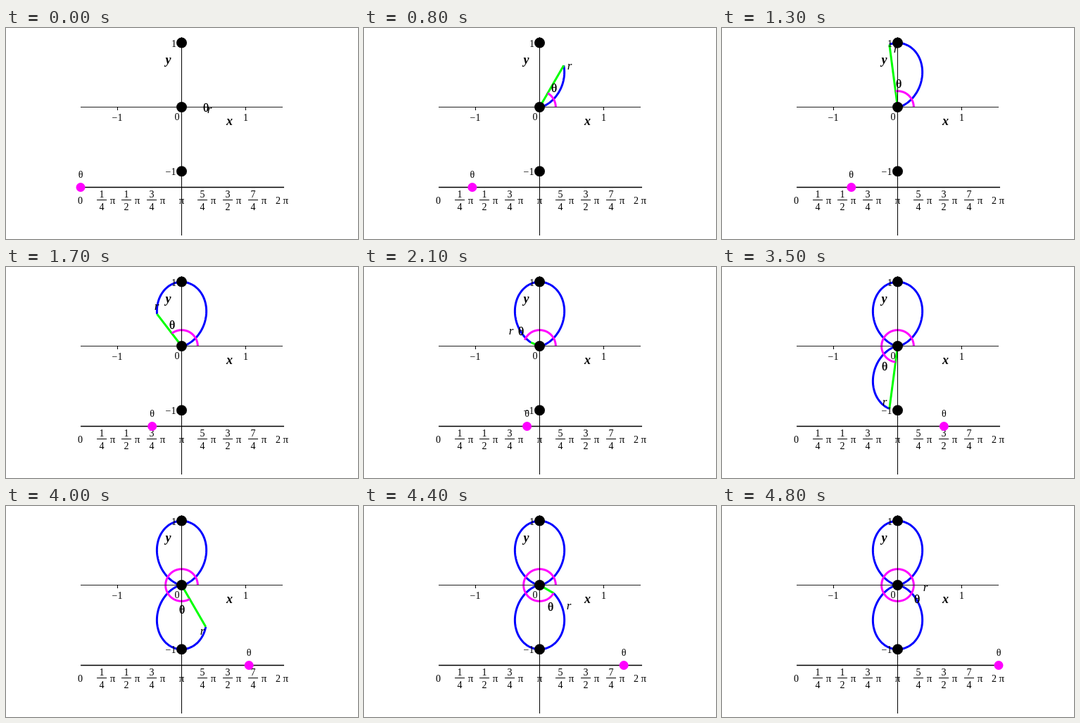
These frames come from a looping animation (500 by 300 pixels, 4900 ms). An HTML page:

```html
<!DOCTYPE html>
<html lang="en">
<head>
<meta charset="utf-8">
<title>Polar curve</title>
<style>
  html, body { margin: 0; width: 100%; height: 100%; overflow: hidden; background: #fff; }
  svg { display: block; width: 500px; height: 300px; }
  text { font: 14px "Liberation Serif", "Times New Roman", serif; text-anchor: middle; }
  .axis { font-weight: bold; font-style: italic; font-size: 18px; }
  .pi { font-size: 15px; }
  #rLabel { font-style: italic; font-size: 17px; }
  #arcLabel { font-size: 17px; stroke: #000; stroke-width: 0.4; }
  #knobLabel { font-size: 14px; }
  polyline, #radius { fill: none; stroke-width: 3; }
</style>
</head>
<body>
<svg viewBox="0 0 500 300">
  <polyline id="curve" stroke="#00f"/>
  <line id="radius" stroke="#0f0"/>
  <polyline id="arc" stroke="#f0f"/>
  <g shape-rendering="crispEdges">
    <rect x="106" y="112" width="287" height="1" fill="#222"/>
    <rect x="249" y="13" width="1" height="282"/>
    <rect x="158" y="112" width="1" height="5"/>
    <rect x="340" y="112" width="1" height="5"/>
  </g>
  <rect x="106" y="225.75" width="289" height="1.5"/>
  <g id="ticks">
    <text x="158" y="132">−1</text>
    <text x="340.5" y="132">1</text>
    <text x="243" y="131">0</text>
    <text x="238.5" y="27">1</text>
    <text x="234" y="209">−1</text>
    <text class="axis" x="317.5" y="138">x</text>
    <text class="axis" x="230.5" y="51">y</text>
    <text x="105.5" y="250">0</text>
    <text class="pi" x="249.5" y="250">π</text>
    <text x="392" y="250">2 <tspan class="pi">π</tspan></text>
  </g>
  <circle cx="249.5" cy="21" r="7.5"/>
  <circle cx="249.5" cy="112.5" r="7.5"/>
  <circle cx="249.5" cy="203.7" r="7.5"/>
  <text id="rLabel">r</text>
  <text id="arcLabel">θ</text>
  <circle id="knob" cy="226.5" r="6.5" fill="#f0f"/>
  <text id="knobLabel" y="213">θ</text>
</svg>
<script>
  const STEPS = 48, STEP_MS = 100, UNIT = 91.3, CX = 249.5, CY = 112.5;
  const $ = id => document.getElementById(id);
  const set = (id, attrs) => {
    for (const k in attrs) $(id).setAttribute(k, attrs[k]);
  };
  const polar = (r, a) => [CX + r * Math.cos(a), CY - r * Math.sin(a)];
  const radiusAt = a => UNIT * Math.sin(a) ** 2;

  // Fraction labels below the slider
  const fractions = [[1, 4], [1, 2], [3, 4], [5, 4], [3, 2], [7, 4]];
  $('ticks').innerHTML += fractions.map(([n, d]) => {
    const x = Math.round(99.7 + 143.5 * n / d);
    return `<text x="${x}" y="241">${n}</text><text x="${x}" y="259">${d}</text>
      <rect x="${x - 7}" y="244" width="14" height="1"/>
      <text class="pi" x="${x + 15.5}" y="250">π</text>`;
  }).join('');

  function trace(step, radius) {
    const points = [];
    for (let i = 0; i <= step * 5; i++) {
      const a = i / 5 / STEPS * 2 * Math.PI;
      points.push(polar(radius(a), a).map(v => v.toFixed(2)).join());
    }
    return points.join(' ');
  }

  function placeLabel(id, [x, y], dx, dy) {
    set(id, { x: Math.round(x + dx), y: Math.round(y + dy) });
  }

  function draw(step) {
    const a = step / STEPS * 2 * Math.PI, r = radiusAt(a);
    const [x2, y2] = polar(r, a);
    const knobX = 106 + 287 * step / STEPS;
    set('curve', { points: trace(step, radiusAt) });
    set('arc', { points: trace(step, () => UNIT / 4) });
    set('radius', { x1: CX, y1: CY, x2, y2 });
    placeLabel('rLabel', polar(40 + 0.47 * r, a - 0.1), 0, 5);
    placeLabel('arcLabel', polar(34, a * 0.9), 0.3, 6);
    set('knob', { cx: knobX });
    set('knobLabel', { x: knobX });
  }

  let shown = -1;
  function tick() {
    const step = Math.floor(performance.now() / STEP_MS) % (STEPS + 1);
    if (step !== shown) draw(shown = step);
    requestAnimationFrame(tick);
  }
  tick();
</script>
</body>
</html>
```
